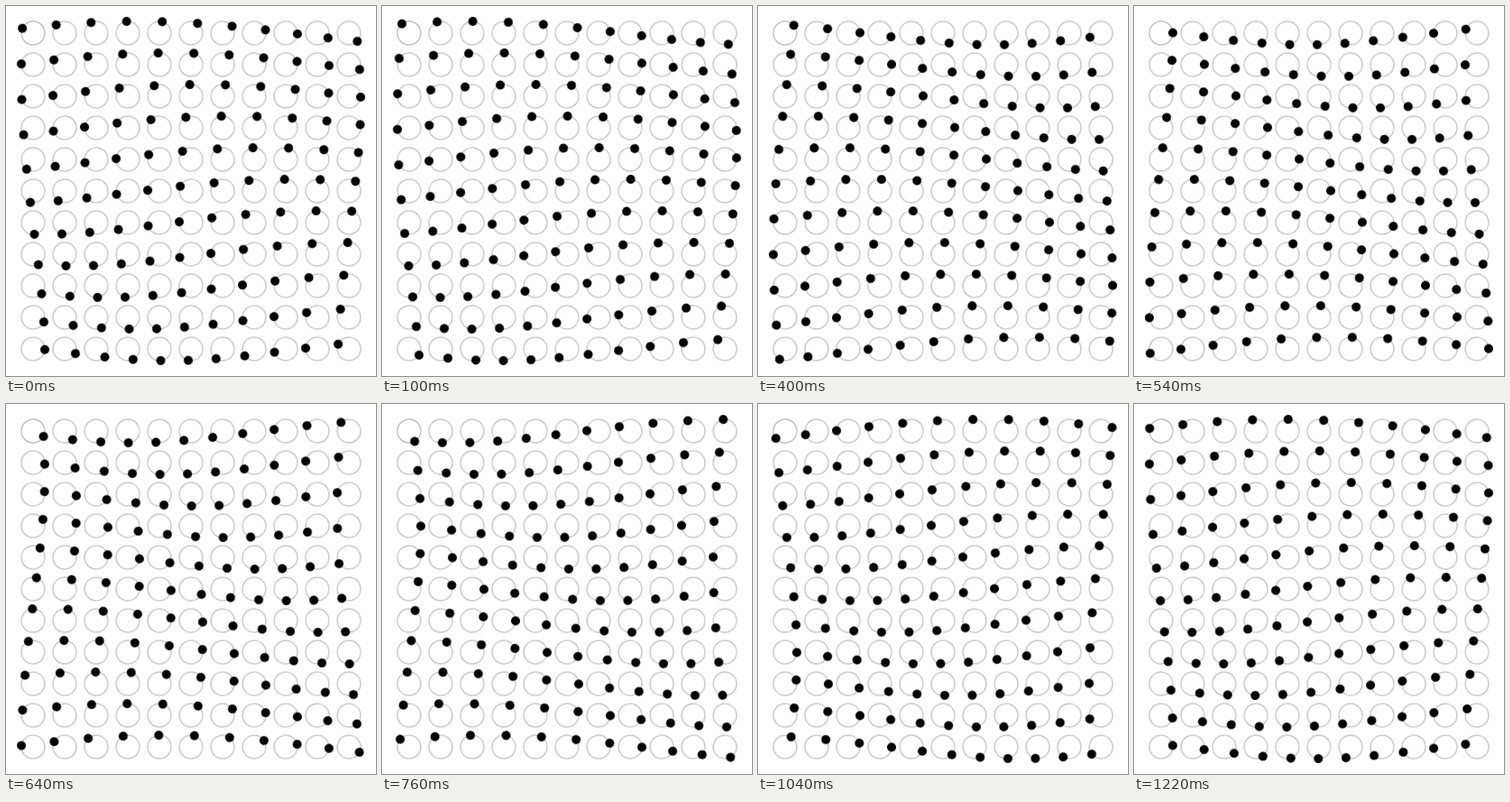
An HTML page for the animation above (1240 ms loop, 410 by 410 pixels).

```html
<!DOCTYPE html>
<html lang="en">
<head>
<meta charset="utf-8">
<title>Phase waves</title>
<style>
  html, body { margin: 0; width: 100%; height: 100%; overflow: hidden; background: #fff; }
  svg { display: block; width: 410px; height: 410px; }
  .ring { fill: none; stroke: #b9b9b9; stroke-width: 1.2; }
  /* 62 steps of 0.1 rad, 20 ms each */
  .dot { transform-origin: 0 0; animation: orbit 1240ms steps(62) infinite; }
  @keyframes orbit {
    from { transform: rotate(0rad); }
    to { transform: rotate(6.2rad); }
  }
</style>
</head>
<body>
<svg id="stage" viewBox="0 0 410 410"></svg>
<script>
  const COUNT = 11, GAP = 35, MARGIN = 30;
  const ORBIT = 13, DOT = 5, START = 3.56;
  const stage = document.getElementById('stage');

  function add(parent, tag, attrs) {
    const el = document.createElementNS('http://www.w3.org/2000/svg', tag);
    for (const key in attrs) el.setAttribute(key, attrs[key]);
    return parent.appendChild(el);
  }

  for (let row = 0; row < COUNT; row++) {
    for (let col = 0; col < COUNT; col++) {
      const x = MARGIN + col * GAP, y = MARGIN + row * GAP;
      const phase = (START + (x - y) / 100) * 180 / Math.PI;
      const cell = add(stage, 'g', { transform: `translate(${x} ${y}) rotate(${phase})` });
      add(cell, 'circle', { class: 'ring', r: ORBIT });
      add(cell, 'circle', { class: 'dot', cx: ORBIT, r: DOT });
    }
  }
</script>
</body>
</html>
```
